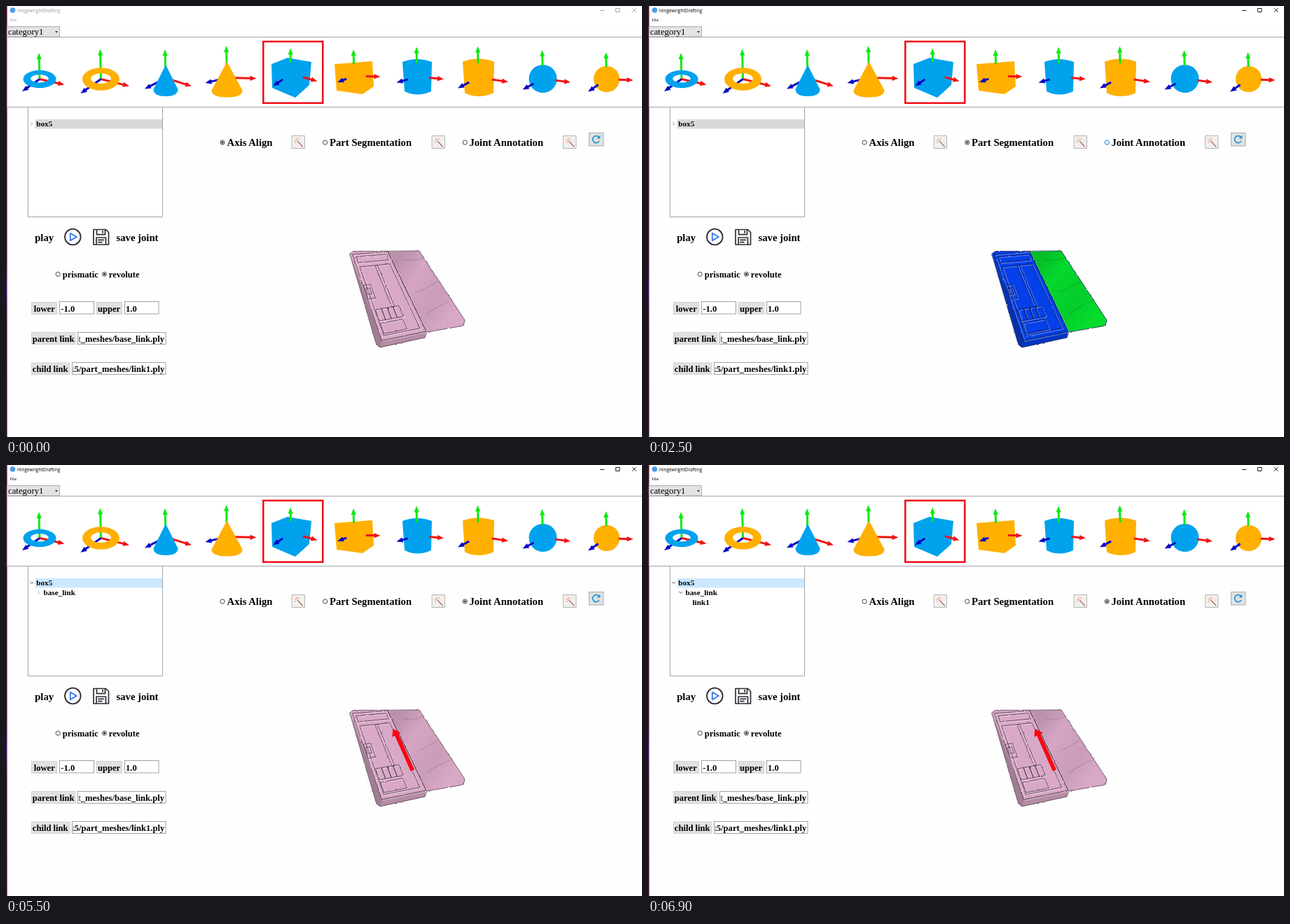
These frames come from a looping animation (908 by 616 pixels, 8 s). An HTML page:

```html
<!DOCTYPE html>
<html lang="en">
<head>
<meta charset="utf-8">
<title>HingewrightDrafting</title>
<style>
html, body { margin: 0; width: 100%; height: 100%; overflow: hidden; background: #fefefe; }
svg { display: block; }
.serif { font-family: "Liberation Serif", serif; font-weight: bold; fill: #000; }
.ui { font-family: "Open Sans", sans-serif; }
.big { font-size: 14.7px; }
.mid { font-size: 12.6px; }
.small { font-size: 11.2px; }
.btn { fill: #e1e1e1; stroke: #d2d2d2; }
.field { fill: #fff; stroke: #8a8a8a; stroke-width: .8; }
.line { fill: none; stroke-linejoin: round; stroke-linecap: round; }
.frame { fill: #fff; stroke: #a0a4aa; }
</style>
</head>
<body>
<svg width="908" height="616" viewBox="0 0 908 616">
  <defs>
    <linearGradient id="edge" x2="0" y2="1">
      <stop offset=".6" stop-color="#4a0d2c"/><stop offset=".66" stop-color="#3d1a78"/>
      <stop offset=".72" stop-color="#4a0d2c"/><stop offset="1" stop-color="#2c0a20"/>
    </linearGradient>
    <linearGradient id="sheen" gradientUnits="userSpaceOnUse" x1="550" y1="375" x2="640" y2="440">
      <stop offset="0" stop-opacity=".14"/><stop offset=".3" stop-opacity=".02"/>
      <stop offset=".7" stop-opacity=".07"/><stop offset="1" stop-opacity="0"/>
    </linearGradient>
    <filter id="rough" x="-5%" y="-5%" width="110%" height="110%" color-interpolation-filters="sRGB">
      <feTurbulence type="fractalNoise" baseFrequency=".2" seed="4"/>
      <feDisplacementMap in="SourceGraphic" scale="2.4" xChannelSelector="R" yChannelSelector="G"/>
    </filter>
  </defs>

  <rect width="908" height="28" fill="#fff"/>
  <rect width="1.6" height="616" fill="url(#edge)"/>

  <!-- window bar -->
  <circle cx="9.5" cy="6" r="3.8" fill="#4a9be8"/>
  <g id="bar" class="ui" fill="currentColor">
    <text x="16" y="8.6" font-size="6.5">HingewrightDrafting</text>
    <text x="5.5" y="22" font-size="6">File</text>
    <path class="line" stroke="currentColor" stroke-width=".9" d="M848.5 6.5h5.5M871 3.5h5v5h-5zM894.3 3.5l5 5m0-5l-5 5"/>
  </g>

  <!-- category box -->
  <rect x="1.5" y="29.5" width="75" height="14.5" fill="#e3e3e3" stroke="#adadad"/>
  <text class="serif" x="3" y="41.2" font-size="12.8" style="font-weight:normal">category1</text>
  <path d="M70 36h4l-2 2.4z" fill="#222"/>

  <rect class="frame" x="1.5" y="44.5" width="910" height="100"/>
  <g id="shapes"></g>
  <rect x="367.3" y="50.8" width="85" height="87.900" fill="none" stroke="#f00c18" stroke-width="2.5"/>

  <!-- tree -->
  <path class="frame" d="M31.5 145V301.5H223.5V145"/>
  <rect id="row1" x="41.5" y="162" width="181.5" height="13.4"/>
  <rect id="row2" x="51.5" y="175.6" width="171.5" height="13.2" fill="#e5f3ff"/>
  <g class="line" stroke-width=".9">
    <path id="shut1" d="M35.8 166.4l2 2.1-2 2.1"/>
    <path id="open1" d="M34.6 167.4l2.1 2 2.1-2"/>
    <path id="shut2" d="M45.8 180.2l2 2.1-2 2.1"/>
    <path id="open2" d="M44.5 181.2l2.1 2 2.1-2"/>
  </g>
  <g class="serif small">
    <text x="43.3" y="172.3">box5</text>
    <text id="kid1" x="53.5" y="186">base_link</text>
    <text id="kid2" x="63.5" y="199.7">link1</text>
  </g>

  <g id="radios"></g>
  <g id="wands"></g>

  <!-- refresh -->
  <rect x="832.5" y="181.5" width="20.5" height="18.5" fill="#e1e1e1" stroke="#adadad"/>
  <path class="line" d="M846.6 193.6a5 5 0 1 1-.4-6.4" stroke="#1a97e0" stroke-width="1.7"/>
  <path d="M848.3 184.6v4.8h-4.8z" fill="#1a97e0"/>

  <g class="serif big">
    <text x="315.6" y="200.2">Axis Align</text>
    <text x="462" y="200.2">Part Segmentation</text>
    <text x="661.4" y="200.2">Joint Annotation</text>
    <text x="41.2" y="336">play</text>
    <text x="157.5" y="336">save joint</text>
  </g>

  <!-- play and save -->
  <circle cx="95.3" cy="330" r="11.3" fill="none" stroke="#2b2b33" stroke-width="1.8"/>
  <path class="line" d="M91.8 324.8l9 5.2-9 5.2z" stroke="#2f74ee" stroke-width="1.8"/>
  <path class="line" stroke="#2f2f35" stroke-width="1.7" d="M125 319.5h17.5l4 4V341H125zM129.5 319.5v7.2h12v-7.2M138 321.5v2.6M129 341v-10h13.5v10M131.8 334.3h7.8M131.8 337.7h5"/>

  <!-- joint form -->
  <g class="btn">
    <rect x="36.5" y="423.5" width="36" height="17"/>
    <rect x="129.5" y="423.5" width="36" height="17"/>
    <rect x="36.5" y="466.5" width="62.5" height="17"/>
    <rect x="36.5" y="510" width="54" height="16.5"/>
  </g>
  <g class="field">
    <rect x="76.5" y="422.5" width="49" height="17.5"/>
    <rect x="169.5" y="422.5" width="48.5" height="17.5"/>
    <rect x="102.5" y="466.5" width="125.5" height="17"/>
    <rect x="94.5" y="509.5" width="133.5" height="17"/>
  </g>
  <g class="serif mid">
    <text x="80.7" y="388">prismatic</text>
    <text x="146.8" y="388">revolute</text>
    <text x="39.7" y="436.7">lower</text>
    <text x="78.3" y="436.7">-1.0</text>
    <text x="131" y="436.7">upper</text>
    <text x="171" y="436.7">1.0</text>
    <text x="37.8" y="479.7">parent link</text>
    <text x="37.8" y="523">child link</text>
    <svg x="104.5" y="467" width="123" height="16"><text x="121.500" y="12.7" text-anchor="end">box5/part_meshes/base_link.ply</text></svg>
    <svg x="95.8" y="510" width="132" height="16"><text x="130.4" y="13" text-anchor="end">box5/part_meshes/link1.ply</text></svg>
  </g>

  <!-- scanned box -->
  <g filter="url(#rough)">
    <path id="lid" d="M544 351L590 350 655 449 653 457 601 466z"/>
    <path d="M544 351L590 350 655 449 653 457 601 466z" fill="url(#sheen)"/>
    <path class="line" d="M586 409Q602 404 616 393M602 440Q622 425 634 422M566 362Q584 366 596 359" stroke="#000" stroke-opacity=".12" stroke-width="1.3"/>
    <path id="base" d="M491 354L496 350.5 545 351 600 465 598 474 534 488 529 484z"/>
    <path d="M491 354L537 478 534 488 529 484z" opacity=".26"/>
    <path d="M537 478L600 465 598 474 534 488z" opacity=".17"/>
    <g class="line">
      <path class="cells" stroke="#fff" stroke-opacity=".28" stroke-width="1.6" transform="translate(1.3 1.2)"/>
      <g id="creases" stroke-opacity=".7">
        <path class="cells"/>
        <path d="M491 354L496 350.5 590 350 655 449 653 457 601 466 598 474 534 488 529 484zM545 351L600 465"/>
      </g>
    </g>
  </g>
  <path id="axis" d="M552.5 377L563.8 382.8 560.3 384.6 583 435.2 577.8 437.7 555.2 387 551.3 388.7z" fill="#fb0510"/>
</svg>

<script>
const LOOP = 8000;
const $ = id => document.getElementById(id);
const mix = (a, b, k) => a + (b - a) * k;

// toolbar shapes, drawn around their own centre
const oval = (rx, ry, y = 0) => `M${-rx} ${y}a${rx} ${ry} 0 1 0 ${2 * rx} 0a${rx} ${ry} 0 1 0 ${-2 * rx} 0z`;
const ring = (rx, ry) => oval(rx, ry) + oval(rx * .54, ry * .45, -.8);
const cone = (r, top, low) => `M0 ${-top}L${-r} ${low}Q${-r} ${low + 10} 0 ${low + 10}T${r} ${low}z`;
const tube = (r, h) => `M${-r} ${-h}Q0 ${-h - 8} ${r} ${-h}L${r - 1} ${h}Q0 ${h + 9} ${3 - r} ${h}z`;

function arrow(dx, dy, color, start) {
  const angle = Math.atan2(dy, dx) * 180 / Math.PI, len = Math.hypot(dx, dy), from = len * start;
  return `<path transform="rotate(${angle})" fill="${color}" d="M${from} -1.5H${len - 9}v-2.100L${len} 0L${len - 9} 3.600v-2.100H${from}z"/>`;
}

// body, centre, green height, red tip, blue tip
const icons = [
  [ring(23.5, 12.8), 48, 104.5, 37.5, 35.5, 8, -25, 17.5],
  [ring(26.5, 16.3), 135.5, 104.5, 43, 40.5, 10, -29, 20.5],
  [cone(17.5, 19, 16), 228, 103, 41, 37, 11.5, -30, 15.5],
  [cone(22, 23, 18), 315.5, 102.5, 45.5, 42, 1, -31, 7.5],
  ['M-28-14L-5-23 29-17 26 16 6 34-27 20z', 407, 97, 36.5, 37.5, 10.5, -26, 17.5],
  ['M-28-17L26-21 28 15 12 26-25 21z', 497, 100, 38, 37.5, 1, -24, 9],
  [tube(21, 21), 587, 101, 42.5, 38, 3.5, -29.5, 8.5],
  [tube(22.5, 22.5), 674.5, 102, 44.5, 42.5, 6.5, -29.5, 15.5],
  [oval(20, 20), 766.5, 104, 41, 39.5, 5, -29, 15.5],
  [oval(18.6, 18.6), 857.5, 104.5, 38.5, 38, 1.5, -26.5, 18]
];
$('shapes').innerHTML = icons.map(([d, x, y, up, rx, ry, bx, by], i) => {
  const inside = i < 4; // rings and cones cover the axes
  const start = inside ? 0 : .45;
  const axes = arrow(-1, -up, '#0bea12', start) + arrow(rx, ry, '#f01414', start) + arrow(bx, by, '#0808c4', start);
  const body = `<path d="${d}" fill="${i % 2 ? '#ffb000' : '#00a2ed'}" fill-rule="evenodd"/>`;
  return `<g transform="translate(${x} ${y})">${inside ? axes + body : body + axes}</g>`;
}).join('');

const radios = { align: [309, 195], seg: [455.7, 195], joint: [655.3, 195], prism: [74.2, 383.3], rev: [140.5, 383.3] };
$('radios').innerHTML = Object.entries(radios).map(([id, [x, y]]) =>
  `<g id="${id}" color="#333" transform="translate(${x} ${y})"><circle r="3.1" fill="#fff" stroke="currentColor" stroke-width=".9"/>` +
  `<circle id="${id}Dot" r="1.7" fill="currentColor" opacity="${id === 'rev' ? 1 : 0}"/></g>`).join('');

$('wands').innerHTML = [408.5, 608.5, 796].map(x =>
  `<g class="line" transform="translate(${x} 185.5)"><rect width="18" height="18" fill="#f0f0f0" stroke="#b4b4b4"/>` +
  `<path d="M8 8L15 15.5" stroke="#b0604f" stroke-width="1.1"/>` +
  `<path d="M6.5 3.500v1.500M4 6.500h1.500M9 5.200l.8-.8M5 9l-.6.6M7 7l.6.6" stroke="#f08a60" stroke-width="1.1"/></g>`).join('');

// position on the tray: u across, v down
function tray(u, v) {
  const x = mix(mix(495, 545, u), mix(537, 600, u), v), y = mix(mix(355, 351, u), mix(478, 465, u), v);
  return x.toFixed(1) + ' ' + y.toFixed(1);
}
const cell = (u, v, w, h) => `M${tray(u, v)}L${tray(u + w, v)} ${tray(u + w, v + h)} ${tray(u, v + h)}z`;
const bars = [0, 1, 2, 3].map(i => cell(.1 + i * .14, .65, .14, .13));
const cells = [
  cell(0, 0, 1, 1), cell(.08, .03, .84, .07), cell(.08, .15, .82, .8), cell(.5, .15, .06, .5),
  cell(.01, .36, .18, .16), cell(.04, .4, .1, .07), ...bars, cell(.1, .81, .52, .12)
].join('');
for (const path of document.querySelectorAll('.cells')) path.setAttribute('d', cells);

// each step holds its value until the next one
function play(id, prop, steps) {
  const frames = steps.map(([t, v]) => ({ offset: t / LOOP, [prop]: v, easing: 'step-end' }));
  frames.push({ offset: 1, [prop]: steps[steps.length - 1][1] });
  $(id).animate(frames, { duration: LOOP, iterations: Infinity });
}
const show = (id, ...times) => play(id, 'opacity', [[0, 0], ...times.map((t, i) => [t, 1 - i % 2])]);
const swap = (id, prop, a, b, from, to) => play(id, prop, [[0, a], [from, b], ...(to ? [[to, a]] : [])]);

const DARK = '#333', MID = '#1a5585', HOT = '#0078d7';
const TICK = '#444', GLOW = '#3cc3f0', DIM = '#8a8a8a';
const hover = (id, on, off) => play(id, 'color', [[0, DARK], [on, MID], [on + 100, HOT], [off, MID], [off + 100, DARK]]);

swap('bar', 'color', '#999', '#000', 1500);

play('alignDot', 'opacity', [[0, 1], [1800, .5], [1900, 0]]);
play('segDot', 'opacity', [[0, 0], [1700, 1], [2700, .5], [2800, 0]]);
show('jointDot', 2600);
hover('seg', 1500, 2200);
hover('joint', 2400, 3000);

swap('lid', 'fill', '#d9a8c7', '#04dc2e', 1700, 2600);
swap('base', 'fill', '#d9a8c7', '#0540e8', 1700, 2600);
swap('creases', 'stroke', '#3d2836', '#000d48', 1700, 2600);
show('axis', 2600);

swap('row1', 'fill', '#d9d9d9', '#cce8ff', 4500);
play('row2', 'opacity', [[0, 0], [6100, .35], [6200, .7], [6300, 1], [6500, 0]]);
play('shut1', 'opacity', [[0, 1], [4500, 0]]);
show('open1', 4500);
show('shut2', 5500, 6600);
show('open2', 4500, 5500, 6600);
swap('shut1', 'stroke', DIM, GLOW, 4100);
swap('open1', 'stroke', GLOW, TICK, 5000);
swap('shut2', 'stroke', GLOW, DIM, 6100, 6500);
swap('open2', 'stroke', TICK, GLOW, 5000, 6900);
show('kid1', 4500);
show('kid2', 4500, 5500, 6600);
</script>
</body>
</html>
```
